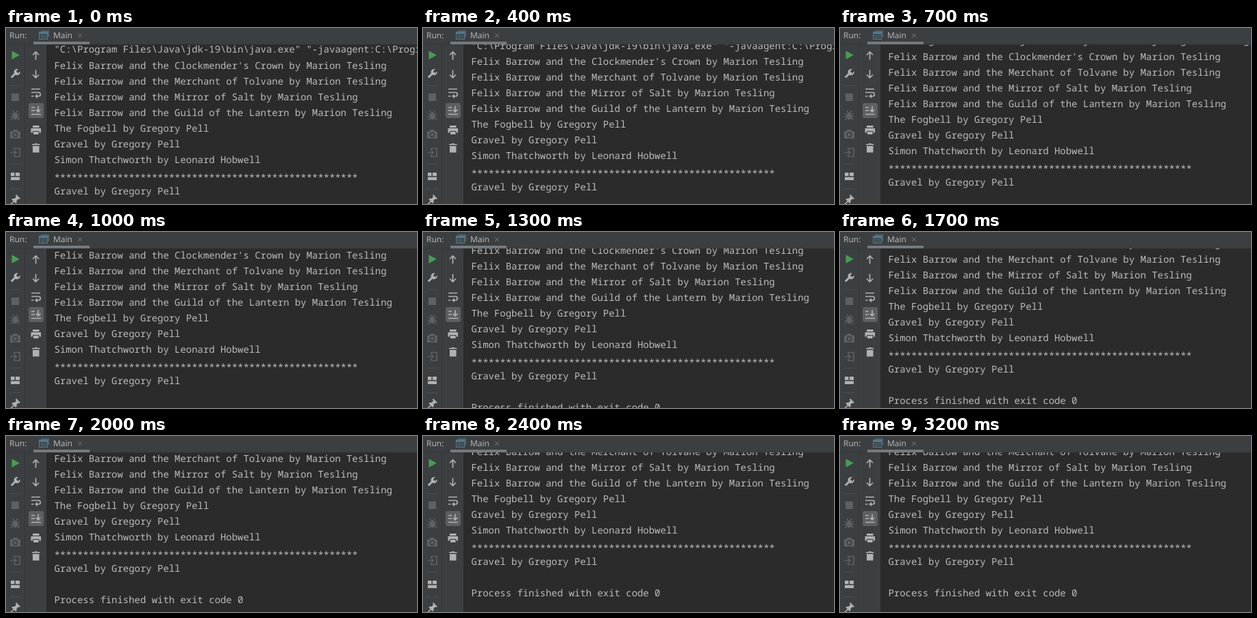
Recreate the animation shown at these times as an HTML page. Size 600 by 258 pixels, loop 3300 ms.

```html
<!DOCTYPE html>
<html lang="en">
<head>
<meta charset="utf-8">
<title>Console output</title>
<style>
  html, body { margin: 0; width: 100%; height: 100%; overflow: hidden; background: #2b2b2b; }
  svg { display: block; }
  text { text-rendering: geometricPrecision; white-space: pre; }
  .ui { font: 12px "Open Sans", "Noto Sans", sans-serif; fill: #bbbdbf; }
  .log { font: 13.95px "Noto Sans Mono", "DejaVu Sans Mono", monospace; fill: #bcbcbc; }
  .line { fill: none; stroke: #afb1b3; stroke-width: 1.7; }
  .solid { fill: #afb1b3; }
  .off .line { stroke: #5e6163; }
  .off .solid { fill: #5e6163; }
  .rule { stroke: #4b4e50; }

  /* one step per 100 ms, then a hold until the loop restarts */
  .scroll { animation: scroll 3300ms -4ms infinite; }
  @keyframes scroll {
    0% { transform: translateY(0); animation-timing-function: steps(2, end); }
    6.0606% { transform: translateY(-.6px); animation-timing-function: steps(22, end); }
    72.7272%, 100% { transform: translateY(-54.5px); }
  }
</style>
</head>
<body>
<svg width="600" height="258" viewBox="0 0 600 258">
  <rect width="600" height="258" fill="#3c3f41"/>
  <rect x="59" y="24" width="541" height="234" fill="#2b2b2b"/>
  <path d="M0 24H600M27.5 24V258" stroke="#343638"/>

  <!-- header -->
  <text class="ui" x="5" y="15">Run:</text>
  <rect x="40" y="20" width="82" height="4" fill="#747a80"/>
  <g>
    <rect x="51" y="3.5" width="12" height="10" fill="#50616b"/>
    <rect x="48.5" y="6" width="12" height="10.5" fill="#3c4a52" stroke="#5d7480"/>
    <path d="M48.5 7.5H60.5" stroke="#4a8ba6" stroke-width="2"/>
    <path d="M51 11.5H58M51 14H58" stroke="#5d7480" stroke-dasharray="1.5 1"/>
  </g>
  <text class="ui" x="69" y="15">Main</text>
  <path d="M105 8L111 14M111 8L105 14" stroke="#74777a"/>

  <!-- first tool column -->
  <path d="M8.5 33.5L20 39.7L8.5 46Z" fill="#499c54"/>
  <g>
    <path d="M7.8 72.5L14 66.2" class="line" stroke-width="3" style="stroke-width:3"/>
    <path d="M17.7 60.3A4.6 4.6 0 1 0 20.6 63.6L17.6 66.3L14.9 63.6Z" class="solid"/>
  </g>
  <path class="rule" d="M5 84.5H22M5 199.5H22M5 235.5H22"/>
  <g class="off">
    <rect class="solid" x="8" y="96" width="11" height="11"/>
    <ellipse class="solid" cx="13.5" cy="129" rx="3.8" ry="5.5"/>
    <path class="line" style="stroke-width:1.4" d="M10 121L12 124M17 121L15 124M7 125L10 127M20 125L17 127M6.5 130H20M7 135L10 132M20 135L17 132"/>
    <path class="solid" d="M6 151.5H9.5L11 149H16L17.5 151.5H21V162H6Z"/>
    <circle cx="13.5" cy="156.5" r="3.2" fill="#5e6163" stroke="#3c3f41" stroke-width="1.5"/>
    <path class="line" d="M12 179V176.5H20V188.5H12V186M6.5 182.5H15M12 179.5L15.2 182.5L12 185.5"/>
  </g>
  <path class="solid" d="M7 212H12.5V217H7ZM14 212H20V217H14ZM7 218.5H20V223H7Z"/>
  <path class="solid" d="M15 244L21 250L19.5 251L18 250.5L15.5 253L15.5 256L14 257L8.5 251.5L9.5 250L12.5 250L15 247.5L14 245.5Z"/>
  <path class="line" d="M11.5 254L7 258.5"/>

  <!-- second tool column -->
  <path class="line" d="M43.5 46.5V35.5M39 39.5L43.5 35L48 39.5"/>
  <path class="line" d="M43.5 61.5V72.5M39 68.5L43.5 73L48 68.5"/>
  <path class="line" d="M37 89.5H50M37 94.5H47.5A2.7 2.7 0 0 1 47.5 100H44M37 100H40.5"/>
  <path class="solid" d="M46 96.8V103.2L42 100Z"/>
  <rect x="33" y="110" width="22" height="22" rx="3" fill="#5b6063"/>
  <path class="line" d="M37 116.5H42M37 121H42M37 126.5H51M47 114.5V122.5M43.8 119.7L47 123L50.2 119.7"/>
  <path class="solid" d="M39 143H48.5V146H39ZM36.5 147H51V153.5H48.5V151H39V153.5H36.5Z"/>
  <rect class="solid" x="40" y="152" width="7.5" height="4"/>
  <path class="solid" d="M38 171.5V170H41.5L42.5 169H45L46 170H49.5V171.5ZM39 173H48.5V182.5H39Z"/>

  <!-- console -->
  <svg x="59" y="24" width="541" height="234" overflow="hidden">
    <g class="log scroll">
      <text x="11.5" y="12">"C:\Program Files\Java\jdk-19\bin\java.exe" "-javaagent:C:\Program Files</text>
      <text x="11.5" y="35.7">Felix Barrow and the Clockmender's Crown by Marion Tesling</text>
      <text x="11.5" y="58.7">Felix Barrow and the Merchant of Tolvane by Marion Tesling</text>
      <text x="11.5" y="81.7">Felix Barrow and the Mirror of Salt by Marion Tesling</text>
      <text x="11.5" y="104.7">Felix Barrow and the Guild of the Lantern by Marion Tesling</text>
      <text x="11.5" y="127.7">The Fogbell by Gregory Pell</text>
      <text x="11.5" y="150.7">Gravel by Gregory Pell</text>
      <text x="11.5" y="173.7">Simon Thatchworth by Leonard Hobwell</text>
      <text x="11.5" y="199.7">*****************************************************</text>
      <text x="11.5" y="219.7">Gravel by Gregory Pell</text>
      <text x="11.5" y="265.7">Process finished with exit code 0</text>
    </g>
  </svg>
</svg>
</body>
</html>
```
